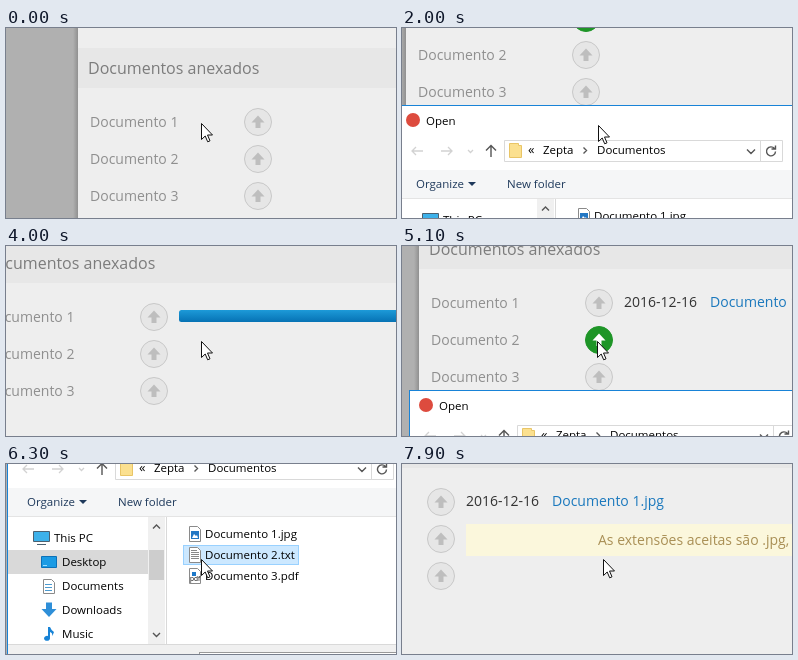
Animation, 390 px wide and 190 px high, one loop 8 s. Source, as an HTML page:

```html
<!DOCTYPE html>
<html lang="pt">
<head>
<meta charset="utf-8">
<style>
html, body { margin: 0; width: 100%; height: 100%; overflow: hidden; background: #eee; }
svg { display: block; }
text { white-space: pre; }
#page { font: 14px "Open Sans", sans-serif; fill: #8f8f8f; }
#dialog { font: 11.5px "Open Sans", "Noto Sans", sans-serif; fill: #000; }
.line { fill: none; stroke: #d9d9d9; }
.grey { fill: none; stroke: #555; stroke-width: 1.4; }
.off { fill: none; stroke: #d2d2d2; stroke-width: 1.3; }
.sheet { fill: #fff; stroke: #8a8a8a; }
.up circle { fill: #e6e6e6; stroke: #c8c8c8; }
.up path { fill: #bebebe; }
.up.on circle { fill: #1e9527; stroke: #1e9527; }
.up.on path { fill: #fff; }
</style>
</head>
<body>
<svg width="390" height="190" viewBox="0 0 390 190">
  <defs>
    <linearGradient id="blue" x2="0" y2="1">
      <stop stop-color="#1d9ad8"/><stop offset="1" stop-color="#0672b4"/>
    </linearGradient>
    <linearGradient id="shade">
      <stop stop-color="#b0b0b0"/><stop offset="1" stop-color="#909090"/>
    </linearGradient>
  </defs>
  <g id="world">
    <g id="page">
      <rect x="-100" y="-100" width="900" height="800" fill="#eee"/>
      <rect x="-100" y="-100" width="168" height="800" fill="#b0b0b0"/>
      <rect x="67" y="-100" width="5" height="800" fill="url(#shade)"/>
      <rect x="72" y="20" width="700" height="40" fill="#e7e7e7"/>
      <text x="82" y="46" font-size="16" fill="#7c7c7c">Documentos anexados</text>
      <g id="rows"></g>
      <rect id="bar" x="277" y="87" height="12" rx="2.5" fill="url(#blue)"/>
      <g id="sent">
        <text x="277" y="98" fill="#333">2016-12-16</text>
        <text x="363" y="98" fill="#1a78bd">Documento 1.jpg</text>
      </g>
      <g id="warn">
        <rect x="277" y="116" width="460" height="32" fill="#fbf7dc"/>
        <text x="409" y="137" fill="#a98f55">As extensões aceitas são .jpg,</text>
      </g>
    </g>
    <g id="dialog" transform="translate(75 201)">
      <rect x="-12.5" y="-19.5" width="640" height="290" fill="#fff" stroke="#1883d7"/>
      <circle cx="4" cy="-5" r="7" fill="#dd4b3e"/>
      <text x="17" y="0">Open</text>

      <path class="off" d="M14 26H3m4-4-4 4 4 4M32 26h11m-4-4 4 4-4 4M59 25l2.500 2.500L64 25"/>
      <path class="grey" stroke-width="1.8" d="M82 32V20.500m-5 5 5-5 5 5"/>
      <path class="line" d="M95.500 15.500h278v21h-278zM351.500 15v21M384.500 15.500h200v21h-200z"/>
      <path fill="#fbe08f" stroke="#e9c566" d="M100.500 18.500h9v2h3v12h-12z"/>
      <text x="119" y="29" font-size="13">«</text>
      <text x="134" y="29">Zepta</text>
      <path class="grey" d="M174.500 22.500l3 3-3 3M338 24.500l4 4 4-4"/>
      <path class="grey" d="M365.500 23.500a4.500 4.500 0 1 0 1 3M366.500 20.500v3.500h-4"/>
      <text x="188" y="29">Documentos</text>

      <rect x="-12" y="45" width="639" height="28" fill="#f5f6f7"/>
      <path class="line" stroke-opacity=".7" d="M-12 73.500h639"/>
      <g fill="#1e395b">
        <text x="7" y="63">Organize</text>
        <path d="M59 57h8l-4 4z"/>
        <text x="98" y="63">New folder</text>
      </g>

      <rect x="-12" y="107" width="140" height="24" fill="#d9d9d9"/>
      <rect x="128" y="74" width="17" height="127" fill="#f0f0f0"/>
      <rect x="129" y="107" width="15" height="30" fill="#cdcdcd"/>
      <path class="grey" stroke-width="2" d="M133 85.500l3.500-3.500 3.500 3.500M133 190l3.500 3.500 3.500-3.500"/>
      <path class="line" d="M146.500 74v127"/>
      <g id="places"></g>
      <path fill="#3db1ea" stroke="#4b6070" d="M13.500 88.500h16v10h-16zM17 101.500h9"/>
      <path fill="#1b9be4" stroke="#0c71b8" d="M21.500 113.500h15v11h-15z"/>
      <path stroke="#9fdcff" d="M23 122.500h4"/>
      <path class="sheet" d="M23.500 136.500h8l3 3v11h-11z"/>
      <path stroke="#4c9bd0" d="M25 141.500h7m-7 3h7m-7 3h7"/>
      <path fill="#2f8fd8" d="M26 159.500h6v6.500h4.500l-7.500 8-7.500-8h4.500z"/>
      <path fill="#1783d6" d="M28 184h2q1 3 4 5-1 3-2 4 1-3-2-4v6a3 2.500 0 1 1-2-2z"/>

      <g id="files"></g>
      <rect x="-12" y="201" width="639" height="69" fill="#f0f0f0"/>
      <path class="line" d="M-12 201.500h639"/>
      <rect x="179.500" y="209.500" width="300" height="22" fill="#fff" stroke="#999"/>
    </g>
  </g>
  <path id="cursor" fill="#fff" stroke="#111" d="M.5.5V16.500L4.200 13 6.700 18.800 9 17.800 6.500 12H11.500Z"/>
</svg>
<script>
const $ = id => document.getElementById(id);
const show = (id, on) => $(id).style.display = on ? '' : 'none';

$('rows').innerHTML = [1, 2, 3].map(n => `
  <g transform="translate(0 ${57 + 37 * n})">
    <text x="84" y="5">Documento ${n}</text>
    <g id="up${n}" class="up" transform="translate(252 0)">
      <circle r="13.5"/><path d="M0-6.500 6.500.5H2.500V6h-5V.5h-4z"/>
    </g>
  </g>`).join('');

$('places').innerHTML = ['This PC', 'Desktop', 'Documents', 'Downloads', 'Music'].map((name, i) =>
  `<text x="${i ? 42 : 34}" y="${99 + 24 * i}">${name}</text>`).join('');

const marks = [
  '<path fill="#2277c4" d="M-4-3h8v8h-8z"/><path fill="#fff" d="M-3 4l2-4 2 2 1-1 1 3z"/>',
  '<path stroke="#888" d="M-4-4.500h6m-6 2h8m-8 2h8m-8 2h8m-8 2h8"/>',
  '<rect x="-3" y="-4" width="4" height="4" fill="#1d78c8"/><text x="-5" y="5" font-size="6.5">pdf</text>'
];
$('files').innerHTML = ['jpg', 'txt', 'pdf'].map((ext, i) => `
  <g transform="translate(0 ${91 + 21 * i})">
    <rect id="pick${i + 1}" x="163.5" y="-9.5" width="${i ? 115 : 119}" height="19" fill="#cce8ff" stroke="#99d1ff"/>
    <g transform="translate(175 0)"><path class="sheet" d="M-5.500-7.500h8l3 3v12h-11z"/>${marks[i]}</g>
    <text x="185" y="4">Documento ${i + 1}.${ext}</text>
  </g>`).join('');

// time, camera x, camera y, pointer x, pointer y
const keys = [
  [0, 0, 0, 195, 95], [1000, 60, 0, 195, 95], [1100, 60, 0, 195, 95],
  [1300, 62, 19, 197, 99], [2800, 75, 201, 195, 95], [2900, 75, 201, 195, 95],
  [3800, 110, 5, 195, 95], [4000, 104, 23, 195, 95], [5000, 55, 37, 195, 95],
  [5100, 55, 37, 195, 95], [6300, 61, 222, 195, 95], [6500, 61, 224, 195, 95],
  [7400, 125, 56, 195, 95], [7900, 213, 56, 201, 95], [8000, 213, 56, 201, 95]
];

function pose(t) {
  const i = keys.findIndex(k => k[0] > t), a = keys[i - 1], b = keys[i];
  const p = (t - a[0]) / (b[0] - a[0]);
  return a.slice(1).map((v, j) => Math.round(v + (b[j + 1] - v) * p));
}

function draw(now) {
  const t = Math.floor(now % 8000 / 100) * 100;
  const within = (from, to) => t >= from && t < to;
  const [x, y, px, py] = pose(t);
  $('world').setAttribute('transform', `translate(${-x} ${-y})`);
  $('cursor').setAttribute('transform', `translate(${px} ${py})`);
  $('up1').classList.toggle('on', within(700, 2900));
  $('up2').classList.toggle('on', within(4700, 6500));
  show('dialog', within(1200, 2900) || within(5100, 6500));
  show('pick1', within(2700, 2900));
  show('pick2', within(6200, 6500));
  show('pick3', false);
  show('bar', within(3000, 4400));
  $('bar').setAttribute('width', Math.max(0, Math.min(320, (t - 2900) * .267)));
  show('sent', t >= 4400);
  show('warn', t >= 6500);
}

const start = performance.now();
function loop() {
  draw(performance.now() - start);
  requestAnimationFrame(loop);
}
loop();
</script>
</body>
</html>
```
